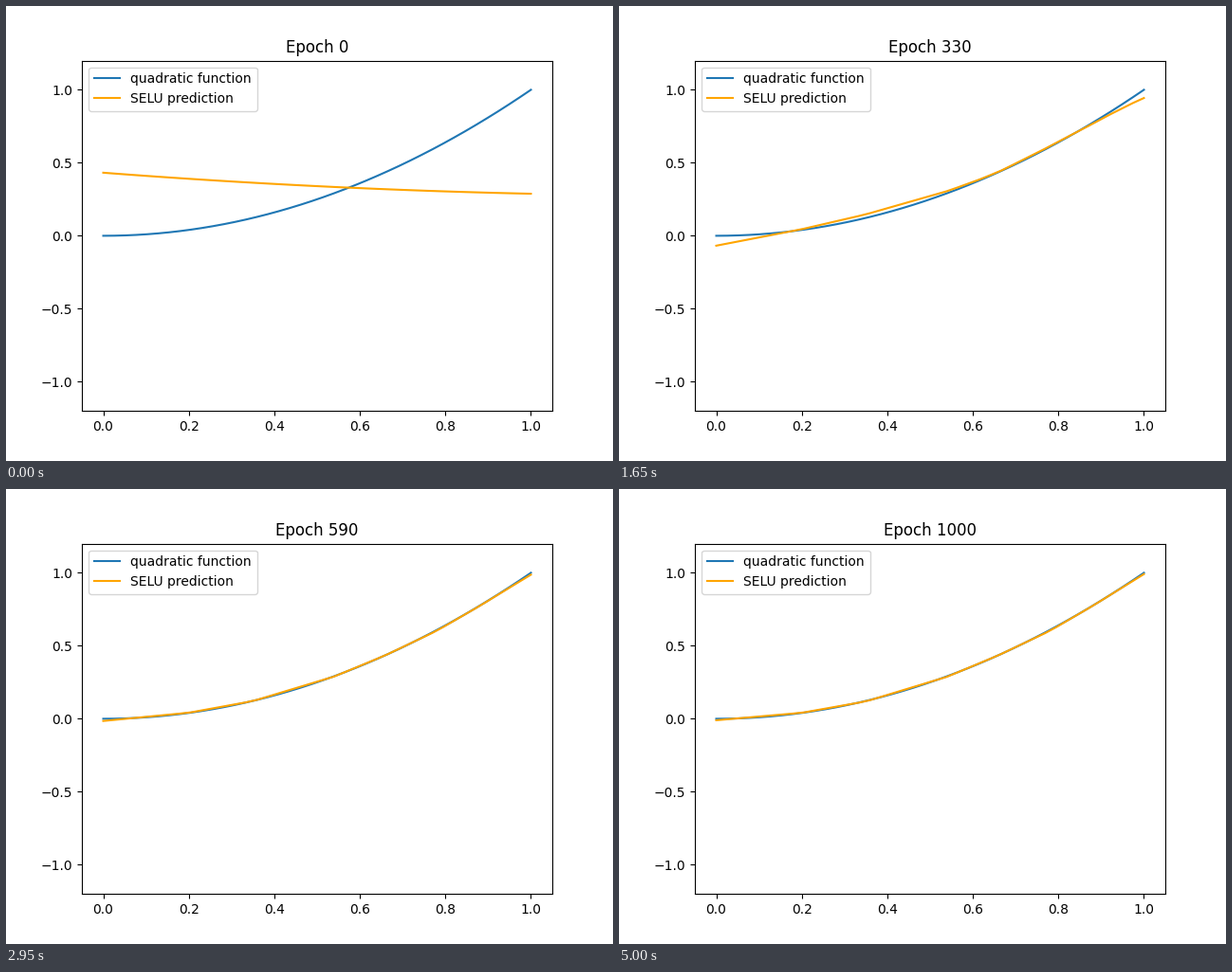
A matplotlib script that plays this animation: 640x480 px, repeating every 5.05 s.

```python
import numpy as np
import matplotlib.pyplot as plt
from matplotlib.animation import FuncAnimation

FRAMES = 101
EPOCHS_PER_FRAME = 10
INTERVAL = 50

x = np.linspace(0, 1, 40)


def bent(px, py):
    """Piecewise linear curve through a few corners, sampled on x."""
    return np.interp(x, px, py)


# The fit goes from a near-flat guess to a line, a rough bend, a fine bend.
start = 0.432 - 0.144 * x + 0.08 * (x * x - x)
straight = x - 1 / 6
rough = bent((0, .55, .62, .67, .8, .92, .974, 1),
             (-.11, .326, .392, .452, .652, .82, .885, .91))
fine = bent((0, .2, .35, .54, .66, .78, .88, 1),
            (-.01, .041, .119, .288, .435, .602, .773, .991))


def prediction(epoch):
    swing = np.exp(-epoch / 22) * np.cos(np.pi * epoch / 40)
    stiff = np.exp(-epoch / 80)
    coarse = 1 / (1 + np.exp((epoch - 350) / 80))
    y = fine + (rough - fine) * coarse
    y = y + (straight - y) * stiff
    return y + (start - y) * swing


fig, ax = plt.subplots(figsize=(6.4, 4.8), dpi=100)
ax.plot(x, x ** 2, label="quadratic function")
line, = ax.plot(x, prediction(0), color="orange", label="SELU prediction")
ax.set_ylim(-1.2, 1.2)
ax.legend(loc="upper left")
title = ax.set_title("Epoch 0")


def update(frame):
    epoch = frame * EPOCHS_PER_FRAME
    line.set_ydata(prediction(epoch))
    title.set_text(f"Epoch {epoch}")
    return line, title


anim = FuncAnimation(fig, update, frames=FRAMES, interval=INTERVAL,
                     repeat=True, repeat_delay=0)
plt.show()
```
